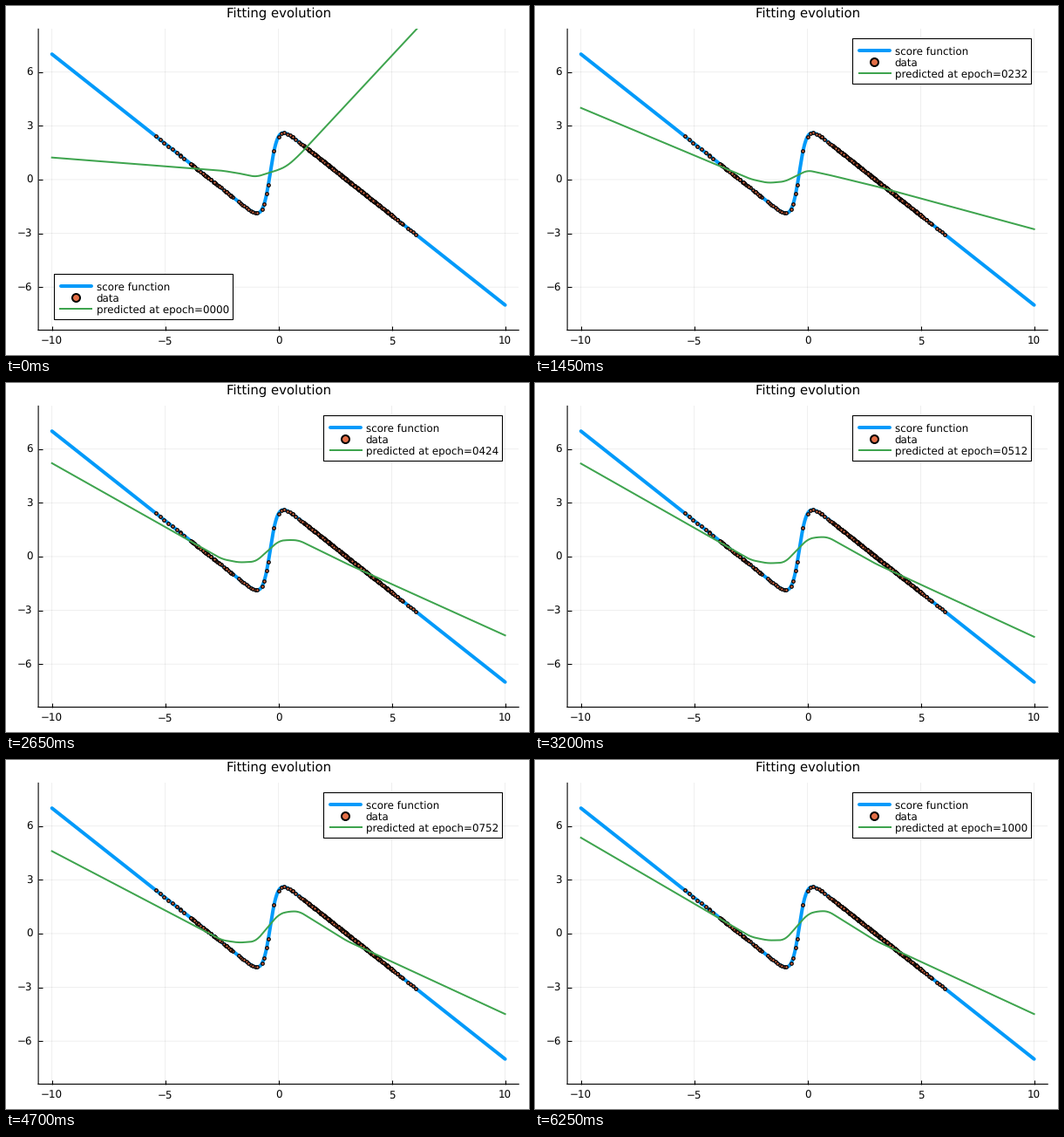
A matplotlib script that plays this animation: 600x400 px, repeating every 6.3 s.

```python
import numpy as np
import matplotlib.pyplot as plt
from matplotlib.animation import FuncAnimation
from matplotlib.patches import Rectangle

W, H, DPI = 600, 400, 100
FRAMES, STEP = 126, 8
LEFT, RIGHT, TOP, BOTTOM = 37.1, 588.2, 26.4, 371.5
XMAX, YMAX = 10.6, 8.4
BLUE, ORANGE, GREEN = "#009AFA", "#E36F47", "#3EA44E"
PT = 72 / DPI  # points per pixel

plt.rcParams.update({"font.family": "DejaVu Sans", "text.hinting": "none"})

# Bends of the network output: untrained, on the plateau, and fitted
BENDS = np.array([-10, -2.5, -1.75, -1, 0, .4, .9, 3, 10])
RAW = np.array([1.23, .5, .35, .15, .54, .78, 1.35, 4.2, 13.7])
PLATEAU = np.array([3.85, .03, -.18, -.1, .5, .37, .23, -.38, -2.62])
FITTED = np.array([5.35, -.18, -.38, -.36, 1.08, 1.24, 1.26, -.4, -4.49])


def bend_heights(i):
    """Fast decay to the plateau, then a rise that is quicker far from zero."""
    decay = np.exp(-i / 5)
    pace = 27 - 1.4 * np.abs(BENDS)
    rise = 1 - np.exp(-(max(i - 26, 0) / pace) ** 1.5)
    tilt = np.interp(i, [45, 64, 94, 109, 125], [0, .015, .075, -.017, 0])
    return (PLATEAU + (RAW - PLATEAU) * decay + (FITTED - PLATEAU) * rise
            + tilt * np.minimum(BENDS, 0))


def smooth_curve(x, heights):
    room = np.minimum(1, 10 - np.abs(x))
    return np.mean([np.interp(x + s * room, BENDS, heights)
                    for s in np.linspace(-.2, .2, 7)], axis=0)


def score(x):
    """Score of 0.1 N(-3, 1) + 0.9 N(3, 1)."""
    return -x + 3 * np.tanh(3 * x + np.log(9) / 2)


def sample_data():
    rng = np.random.default_rng(4)
    left = rng.normal(-3, .9, 60)
    right = rng.normal(3, 1.1, 430)
    return np.concatenate([
        left[(left > -4.4) & (left < -1.6)],
        right[(right > .6) & (right < 5.65)],
        np.linspace(-5.42, -4.5, 6), np.linspace(-1.6, -.95, 8),
        [-.72, -.64, -.52, -.45, -.2, 0], np.linspace(.14, .62, 5),
        np.linspace(5.72, 6.06, 4)])


fig = plt.figure(figsize=(W / DPI, H / DPI), dpi=DPI, facecolor="white")
ax = fig.add_axes([LEFT / W, 1 - BOTTOM / H, (RIGHT - LEFT) / W, (BOTTOM - TOP) / H])
ax.set(xlim=(-XMAX, XMAX), ylim=(-YMAX, YMAX),
       xticks=range(-10, 11, 5), yticks=range(-6, 7, 3))
ax.set_axisbelow(True)
ax.grid(color="black", alpha=.08, lw=.8 * PT, snap=False)
ax.tick_params(direction="in", length=5 * PT, width=1.1 * PT,
               labelbottom=False, labelleft=False)
for side, spine in ax.spines.items():
    spine.set_visible(side in ("left", "bottom"))
    spine.set_linewidth(1.1 * PT)
    spine.set_snap(False)

# Full-stage layer in pixels, y pointing down
stage = fig.add_axes([0, 0, 1, 1])
stage.set(xlim=(0, W), ylim=(H, 0))
stage.axis("off")


def label(x, y, text, size=11.9, ha="left"):
    return stage.text(x, y, text, fontsize=size * PT, ha=ha, va="baseline", zorder=6)


def number(v):
    return str(v).replace("-", "\u2212")


label(312.7, 13, "Fitting evolution", 14.9, "center")
for v in range(-10, 11, 5):
    label((LEFT + RIGHT) / 2 + v * (RIGHT - LEFT) / (2 * XMAX), 387.4, number(v), ha="center")
for v in range(-6, 7, 3):
    label(30.3, 203.3 - v * (BOTTOM - TOP) / (2 * YMAX), number(v), ha="right")

xs = np.linspace(-10, 10, 501)
data = sample_data()
ax.plot(xs, score(xs), color=BLUE, lw=4 * PT, solid_capstyle="round", zorder=3)
ax.plot(data, score(data), "o", ms=3.5 * PT, mfc=ORANGE, mec="black",
        mew=1.2 * PT, zorder=4)
curve, = ax.plot([], [], color=GREEN, lw=2 * PT, zorder=5)

BOX_W, BOX_H = 205.4, 52
box = stage.add_patch(Rectangle((0, 0), BOX_W, BOX_H, fc="white", ec="black",
                                lw=1.1 * PT, zorder=4))
keys = [
    stage.plot([], [], color=BLUE, lw=4 * PT, solid_capstyle="round", zorder=5)[0],
    stage.plot([], [], "o", ms=9 * PT, mfc=ORANGE, mec="black", mew=2 * PT, zorder=5)[0],
    stage.plot([], [], color=GREEN, lw=2 * PT, solid_capstyle="butt", zorder=5)[0],
]
names = [label(0, 0, s) for s in ("score function", "data", "")]


def place_legend(x, y):
    box.set_xy((x, y))
    for row, (key, name) in enumerate(zip(keys, names)):
        mid = y + .7 + 13 * (row + 1)
        ends = ([x + 8, x + 43], [x + 25], [x + 6.5, x + 44.5])[row]
        key.set_data(ends, [mid] * len(ends))
        name.set_position((x + 48.6, mid + 4.3))


def draw(i):
    heights = bend_heights(i)
    curve.set_data(xs, smooth_curve(xs, heights))
    names[2].set_text(f"predicted at epoch={i * STEP:04d}")
    # The legend leaves the top right corner free for a rising curve
    if heights[-1] > 4:
        place_legend(54.9, 307.4)
    else:
        place_legend(569.4 - BOX_W, 37.4)
    return [curve, box, *keys, *names]


anim = FuncAnimation(fig, draw, frames=FRAMES, interval=50, repeat=True,
                     repeat_delay=0, blit=False)
plt.show()
```
